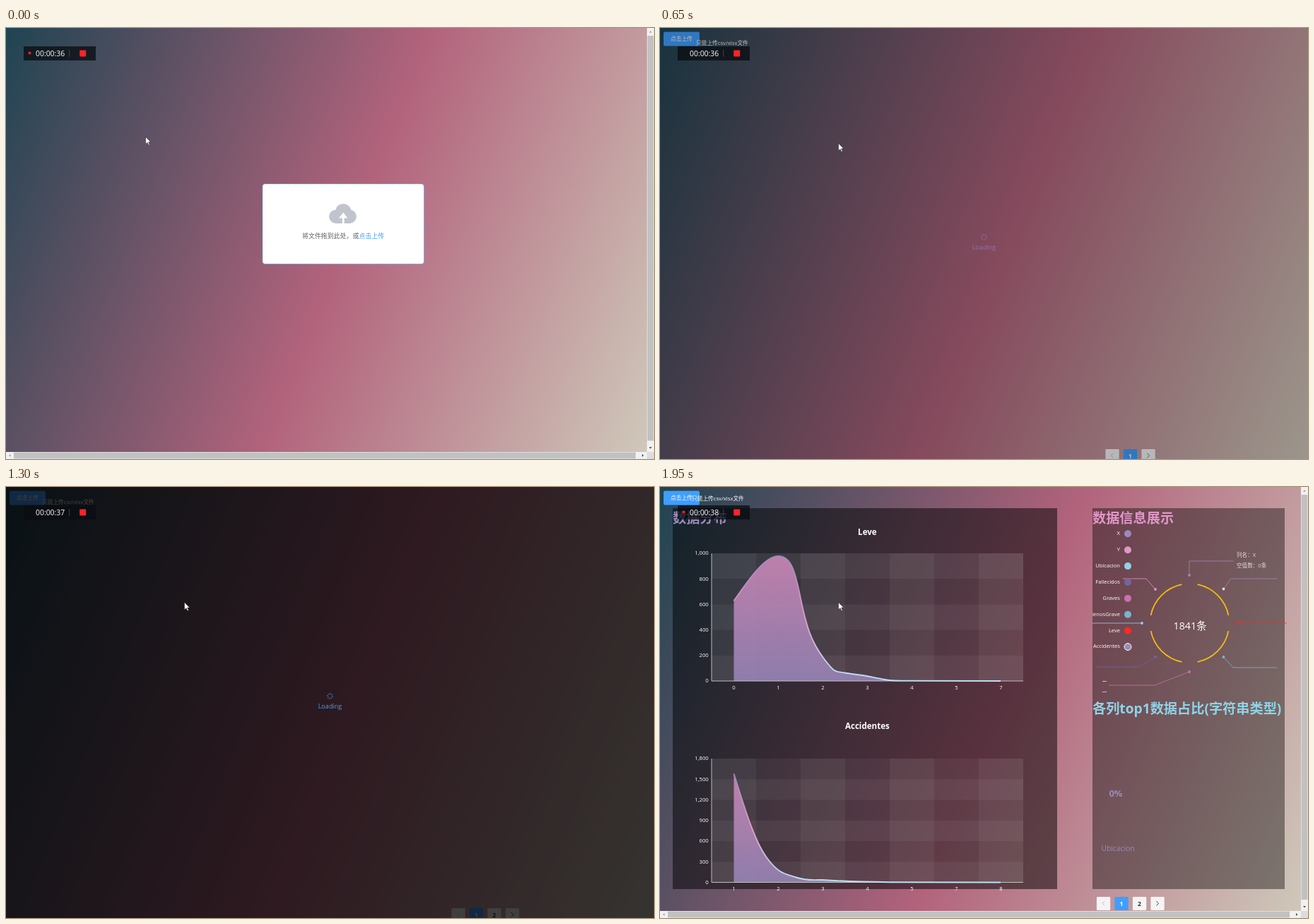
An HTML page for the animation above (2000 ms loop, 917 by 611 pixels).

```html
<!DOCTYPE html>
<html lang="zh-CN">
<head>
<meta charset="utf-8">
<title>Upload and analysis</title>
<style>
html, body { margin: 0; width: 917px; height: 611px; overflow: hidden; }
svg { display: block; font-family: "Open Sans", "Noto Sans", "Noto Sans CJK SC", "Noto Sans CJK", sans-serif; }
</style>
</head>
<body>
<svg id="stage" width="917" height="611" viewBox="0 0 917 611"></svg>
<script>
const LOOP = 2000, STEP = 50;
const BLUE = '#409eff', PALETTE = ['#9b8bba', '#e098c7', '#8fd3e8', '#71669e', '#cc70af', '#7cb4cc', '#ff2a1c', '#9b8bba'];
const [PURPLE, PINK, CYAN] = PALETTE;

const rect = (x, y, w, h, fill, extra = '') => `<rect x="${x}" y="${y}" width="${w}" height="${h}" fill="${fill}" ${extra}/>`;
const circle = (x, y, r, fill, extra = '') => `<circle cx="${x}" cy="${y}" r="${r}" fill="${fill}" ${extra}/>`;
const line = (d, color, width = 1, extra = '') => `<path d="${d}" fill="none" stroke="${color}" stroke-width="${width}" ${extra}/>`;
const text = (x, y, size, fill, str, extra = '') => `<text x="${x}" y="${y}" font-size="${size}" fill="${fill}" ${extra}>${str}</text>`;
const group = (id, body, extra = '') => `<g id="${id}" ${extra}>${body}</g>`;
const times = (n, fn) => Array.from({ length: n }, (_, i) => fn(i)).join('');
const MID = 'text-anchor="middle"', END = 'text-anchor="end"', BOLD = 'font-weight="700"';

function uploadCard() {
  const cloud = `<path fill="#c0c4cc" d="M467 277A9.6 9.6 0 0 1 466.500 257.800A11 11 0 0 1 488 257.800A9.700 9.700 0 0 1 487 277H478.700V269.500H483.500L477.300 261.500L471 269.500H475.900V277Z"/>`;
  return rect(363, 221, 228.5, 113.5, '#fff', `rx="4" stroke="${BLUE}" stroke-width=".7" stroke-dasharray="2 1.2"`) + cloud +
    `<text x="419" y="298" font-size="8.95" fill="#606266">将文件拖到此处，或<tspan fill="${BLUE}">点击上传</tspan></text>`;
}

function scrollbars() {
  const arrow = (x, y, turn, fill) => `<path d="M-2 1H2L0 -1.500Z" fill="${fill}" transform="translate(${x} ${y}) rotate(${turn})"/>`;
  return rect(907, 0, 10, 611, '#f1f1f1') + rect(0, 601, 917, 10, '#f1f1f1') +
    rect(907.6, 11, 8.8, 574, '#c1c1c1') + rect(11, 601.6, 880, 8.8, '#c1c1c1') + rect(907, 601, 10, 10, '#dcdcdc') +
    arrow(912, 5.5, 0, '#a3a3a3') + arrow(912, 595, 180, '#505050') +
    arrow(5.5, 606, -90, '#a3a3a3') + arrow(901, 606, 90, '#505050');
}

function pager() {
  const box = (i, fill) => rect(630.4 + i * 25.5, 597, 19.3, 19, fill, 'rx="1.3"');
  const digit = (i, fill) => text(640 + i * 25.5, 609.6, 8.6, fill, i, `${MID} ${BOLD}`);
  const chevron = (x, s, color) => line(`M${x - s * 1.6} 603L${x + s * 1.6} 606.300L${x - s * 1.6} 609.600`, color, 0.9);
  return box(0, '#f4f4f5') + box(1, BLUE) + digit(1, '#fff') + box(2, '#f4f4f5') +
    group('prev', chevron(640, -1, '#b4b8c0')) + group('nextNear', chevron(691, 1, '#606266')) +
    group('secondPage', digit(2, '#303133') + box(3, '#f4f4f5') + chevron(716.5, 1, '#303133'));
}

const panels = (x1, w1, x2, w2, y, h) => rect(x1, y, w1, h, '#000', 'opacity=".5"') + rect(x2, y, w2, h, '#000', 'opacity=".4"');
const headings = (x1, x2, y, y2) => [[x1, y, PURPLE, '数据分布'], [x2, y, PINK, '数据信息展示'], [x2, y2, CYAN, '各列top1数据占比(字符串类型)']]
  .map(([x, yy, c, s]) => text(x, yy, 19.2, c, s, BOLD)).join('');

function unsizedResults() {
  return panels(24, 549.5, 624, 275, 36, 549.5) + headings(24, 624, 56, 331) +
    line('M24.500 80V97M31 81V97M31 97.500H80', '#ccc', 0.8) +
    `<path d="M33 98V86C37 82 40 87 43 94Q50 97 78 97V98Z" fill="url(#area)"/>` +
    text(55, 73, 11.6, '#fff', 'Leve', `${MID} ${BOLD}`) +
    text(55, 105, 11.6, '#fff', 'Accidentes', `${MID} ${BOLD}`) +
    times(7, i => text(33.5 + i * 7.2, 109.5, 7.7, '#ddd', '0223458'[i], MID)) +
    text(635, 105.8, 14.3, '#fff', '1841条') +
    group('clipped', text(632, 365, 12.8, PURPLE, '0%', MID) + text(635, 388.3, 10.3, PURPLE, 'Ubicacion', MID), 'clip-path="url(#nearClip)"');
}

function chart({ title, titleY, top, bottom, rows, step, names, curve }) {
  const left = 73, right = 514, cell = (right - left) / 7, rowH = (bottom - top) / rows;
  const tint = i => `rgba(255,255,255,${i % 2 ? 0.025 : 0.07})`;
  return text(293.4, titleY, 11.6, '#fff', title, `${MID} ${BOLD}`) +
    times(7, i => rect(left + i * cell, top, cell, bottom - top, tint(i))) +
    times(rows, i => rect(left, bottom - (i + 1) * rowH, right - left, rowH, tint(i))) +
    `<path d="${curve}V${bottom}H104.500Z" fill="url(#area)" opacity=".92"/>` +
    line(`M${left} ${top}V${bottom}H${right}`, '#ccc', 0.9) +
    line(curve, `url(#stroke${title})`, 1.9, 'stroke-linejoin="round"') +
    times(rows + 1, i => text(68.7, bottom - i * rowH + 2.3, 7.7, '#fff', (i * step).toLocaleString('en-US'), END)) +
    times(7, i => text(left + (i + 0.5) * cell, bottom + 11.6, 7.7, '#fff', names[i], MID));
}

function ring() {
  const cx = 749.5, cy = 193, r = 56, gap = 0.2;
  const at = a => `${cx + r * Math.cos(a)} ${cy + r * Math.sin(a)}`;
  return times(4, i => line(`M${at(i * Math.PI / 2 + gap)}A${r} ${r} 0 0 1 ${at((i + 1) * Math.PI / 2 - gap)}`, '#f5bd0d', 1.8)) +
    text(750, 201.6, 14.3, '#fff', '1841条', MID);
}

function leaders() {
  return [
    [749, 125, 'V105H812', 0], [797.5, 144.5, 'L808 130H873', 0, '#ddd'], [817, 193, 'H887', 6],
    [797.5, 241, 'L811 256H873', 5], [749, 262, 'L700 281H635', 4], [701, 241, 'L678 255H616', 3],
    [682, 193, 'H612', 2], [701, 145, 'L688 130H655', 1]
  ].map(([x, y, d, c, dot]) => line(`M${x} ${y}${d}`, PALETTE[c], 0.8) + circle(x, y, 1.9, dot || PALETTE[c])).join('');
}

function results() {
  const names = ['X', 'Y', 'Ubicacion', 'Fallecidos', 'Graves', 'MenosGrave', 'Leve', 'Accidentes'];
  const legend = names.map((name, i) => {
    const y = 66.3 + i * 22.9;
    return text(651, y + 1.8, 7.6, '#fff', name, END) + circle(662, y, 5, PALETTE[i], i === 7 ? 'stroke="#fff" stroke-width="1"' : '');
  }).join('');
  return panels(18, 544, 612, 272, 30, 540) + headings(18, 612, 50.5, 321) +
    chart({
      title: 'Leve', titleY: 67.5, top: 94, bottom: 275, rows: 5, step: 200, names: [0, 1, 2, 3, 4, 5, 7],
      curve: 'M104.500 161.500C125 132 148 98 167.500 98C185 98 191 118 199 158S214 219 231 242S248 261 262 263.500S282 266 293 268S315 273 325 274S345 274.500 356 274.600L482 275'
    }) +
    chart({
      title: 'Accidentes', titleY: 342.5, top: 385, bottom: 560.5, rows: 6, step: 300, names: [1, 2, 3, 4, 5, 7, 8],
      curve: 'M104.500 406.500C118 450 133 500 150 524S176 548 193 553.500S222 556.500 230 557S275 559.500 325 560.200L482 560.500'
    }) +
    leaders() + ring() + group('legend', legend, 'clip-path="url(#farClip)"') +
    text(816, 99, 7.6, '#ddd', '列名：X') + text(816, 114, 7.6, '#ddd', '空值数：0条') +
    line('M626 275.500H632M626 290.500H632', '#ddd', 0.8) +
    text(645, 439, 13, PURPLE, '0%', `${MID} ${BOLD}`) + text(648, 515.5, 10.3, PURPLE, 'Ubicacion', MID);
}

function recorder() {
  return rect(25, 26, 102, 20, '#0a0d12', 'opacity=".76"') +
    group('dot', circle(33.5, 35.6, 2, '#f5222d')) +
    text(42, 39.5, 10.4, '#fff', '', 'id="clock"') +
    line('M89.700 31V41', '#4a4f55', 0.8) + rect(104.2, 31.4, 9, 9, '#ff2328', 'rx="1"');
}

const verticalGradient = (id, y1, y2, colors) => `<linearGradient id="${id}" gradientUnits="userSpaceOnUse" x1="0" x2="0" y1="${y1}" y2="${y2}">` +
  colors.map((c, i) => `<stop offset="${i / (colors.length - 1)}" stop-color="${c}"/>`).join('') + '</linearGradient>';

document.getElementById('stage').innerHTML = `<defs>
  <linearGradient id="sky" gradientUnits="userSpaceOnUse">
    <stop offset="0" stop-color="#204452"/><stop offset=".525" stop-color="#b2637c"/><stop offset="1" stop-color="#cfc8ba"/>
  </linearGradient>
  <linearGradient id="area" x1="0" x2="0" y1="0" y2="1"><stop stop-color="#c985b4"/><stop offset="1" stop-color="#9482b3"/></linearGradient>
  ${verticalGradient('strokeLeve', 98, 275, [PURPLE, PINK, '#b9e2f2'])}
  ${verticalGradient('strokeAccidentes', 406, 560.5, [PURPLE, PINK, '#b9e2f2'])}
  <clipPath id="nearClip">${rect(624, 36, 275, 550, '#000')}</clipPath>
  <clipPath id="farClip">${rect(612, 30, 272, 540, '#000')}</clipPath>
</defs>` +
  rect(0, 0, 917, 611, 'url(#sky)') +
  group('upload', uploadCard()) +
  group('unsized', unsizedResults()) + group('results', results()) +
  group('header', rect(5, 5.5, 51, 20, BLUE, 'rx="2"') + text(30.5, 18, 7.7, '#fff', '点击上传', MID)) +
  group('hint', text(51, 23.7, 7.7, '#fff', '只能上传csv/xlsx文件')) +
  group('pager', pager()) + group('bars', scrollbars()) +
  group('loading', rect(0, 0, 917, 611, '#000', 'opacity=".74"') +
    group('spinner', times(8, i => `<path d="M0 -2.500V-4.400" stroke="${BLUE}" stroke-width=".9" transform="rotate(${i * 45})"/>`)) +
    text(458.5, 314, 9.1, BLUE, 'Loading', MID)) +
  group('recorder', recorder()) +
  group('cursor', '<path d="M0 0V10.500L2.500 8.200L4.200 12L5.900 11.200L4.200 7.600H7.500Z" fill="#fff" stroke="#222" stroke-width=".6"/>');

const el = id => document.getElementById(id);
const show = (id, on) => el(id).setAttribute('display', on ? 'inline' : 'none');
const attr = (id, name, value) => el(id).setAttribute(name, value);
const clamp = v => Math.max(0, Math.min(1, v));

function setSky(w, h) {
  const a = 112 * Math.PI / 180, dx = Math.sin(a), dy = -Math.cos(a), half = (w * dx + h * dy) / 2;
  attr('sky', 'x1', w / 2 - dx * half);
  attr('sky', 'y1', h / 2 - dy * half);
  attr('sky', 'x2', w / 2 + dx * half);
  attr('sky', 'y2', h / 2 + dy * half);
}

function render(t) {
  const first = t < 600, final = t >= 1950, twoPages = t >= 1300;
  const scrolling = first || final;
  setSky(scrolling ? 907 : 917, scrolling ? 601 : 611);
  show('bars', scrolling);
  show('upload', first);
  show('header', !first);
  show('hint', !first);
  attr('hint', 'transform', final ? 'translate(-6 -5)' : '');
  show('pager', !first);
  attr('pager', 'transform', final ? 'translate(-12.5 -16)' : '');
  show('prev', t >= 650);
  show('nextNear', t >= 650 && !twoPages);
  show('secondPage', twoPages);
  show('unsized', t >= 1850 && !final);
  show('results', final);
  show('loading', !scrolling);
  attr('loading', 'opacity', t >= 1850 ? 0.88 : clamp((t - 610) / 120));
  attr('spinner', 'transform', `translate(458.5 296.5) rotate(${t * 0.18})`);

  const move = 1 - (1 - clamp(t / 500)) ** 2;
  attr('cursor', 'transform', `translate(${197.5 + 55 * move} ${154.2 + 9.3 * move})`);
  show('dot', (t + 200) % 1000 < 500);
  el('clock').textContent = '00:00:' + (36 + Math.floor((t + 200) / 1000));
}

const start = performance.now();
function tick() {
  const t = (performance.now() - start) % LOOP;
  render(Math.floor(t / STEP) * STEP);
  requestAnimationFrame(tick);
}
tick();
</script>
</body>
</html>
```
